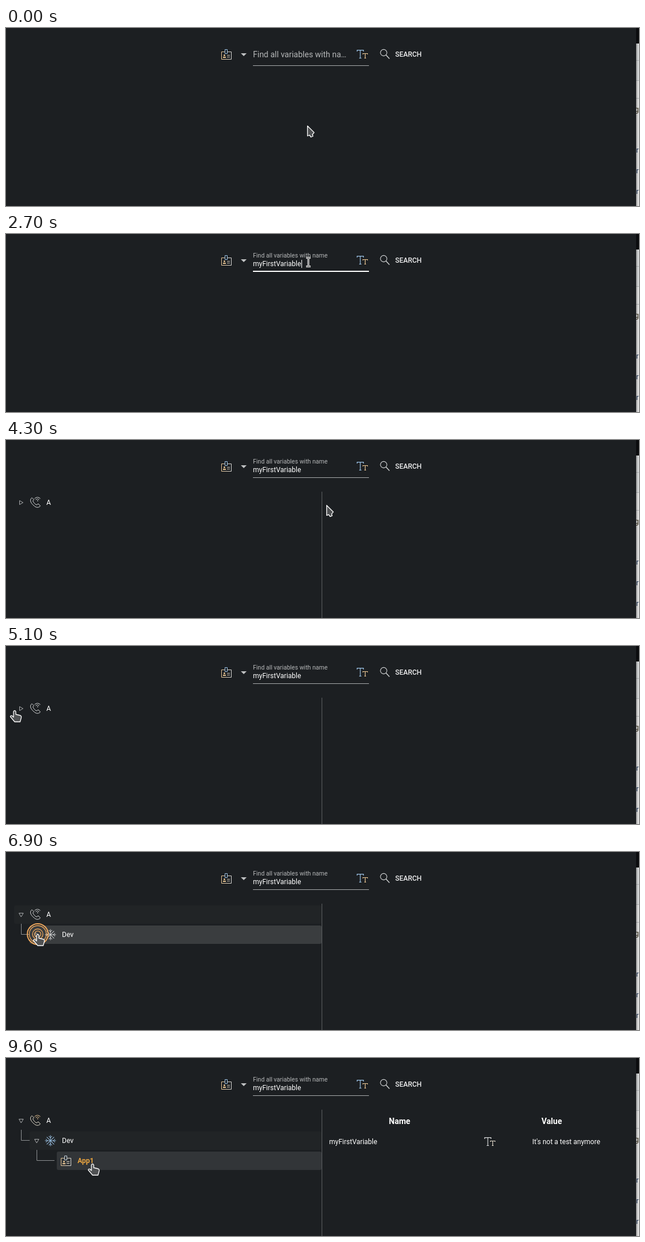
An HTML page with a canvas that plays this animation: 1097 by 310 pixels, repeating every 9.7 s.

```html
<!DOCTYPE html>
<html lang="en">
<head>
<meta charset="utf-8">
<title>Variable search</title>
<style>
html, body { margin: 0; width: 1097px; height: 310px; overflow: hidden; background: #1c1f22; }
canvas { display: block; }
</style>
</head>
<body>
<canvas id="stage" width="1097" height="310"></canvas>
<script>
const g = document.getElementById('stage').getContext('2d');
const LOOP = 9700, STEP = 100;
const GRAY = '#a9abad', DIM = '#85888a', LIGHT = '#d4d6d7', WHITE = '#fff';
const BLUE = '#9cc3e6', SAND = '#e6c391', ORANGE = '#eda75d';

// Pointer legs: start, end, from x,y, control x,y, to x,y
const LEGS = [
  [400, 1000, 522, 170, 526, 100, 512, 41],
  [2600, 2700, 512, 41, 518, 45, 524, 49],
  [2700, 3100, 524, 49, 620, 80, 720, 48],
  [4000, 5000, 720, 48, 330, 232, 19, 112],
  [5000, 5100, 19, 112, 17, 112, 15, 112],
  [5100, 5400, 15, 112, 20, 112, 24, 111],
  [6000, 6800, 24, 111, 38, 130, 55, 143],
  [7000, 8000, 55, 143, 100, 172, 150, 184]
];
const CLICKS = [1100, 3500, 5500, 6900, 8100];

const clamp = v => Math.max(0, Math.min(1, v));
const progress = (t, a, b) => clamp((t - a) / (b - a));
const smooth = u => u * u * (3 - 2 * u);
const easeOut = u => 1 - (1 - u) ** 3;
const mix = (a, b, u) => a + (b - a) * u;

function text(s, x, y, color = WHITE, size = 12, weight = 400) {
  g.font = `${weight} ${size}px Roboto, sans-serif`;
  g.fillStyle = color;
  g.fillText(s, x, y);
}

function rect(x, y, w, h, color, r = 0) {
  g.fillStyle = color;
  g.beginPath();
  g.roundRect(x, y, w, h, r);
  g.fill();
}

function stroke(d, color, width = 1) {
  g.strokeStyle = color;
  g.lineWidth = width;
  g.stroke(new Path2D(d));
}

function circle(x, y, r, color, width = 1) {
  g.beginPath();
  g.arc(x, y, r, 0, 7);
  g.strokeStyle = color;
  g.lineWidth = width;
  g.stroke();
}

function at(x, y, draw) {
  g.save();
  g.translate(x, y);
  draw();
  g.restore();
}

function badge(x, y, left, right, clip) {
  at(x, y, () => {
    const fade = g.createLinearGradient(0, 0, 20, 0);
    fade.addColorStop(0, left);
    fade.addColorStop(1, right);
    stroke('M7 5.5H1.5V18.5H18.5V5.5H12M11 11.5H16M11 14.5H16', fade);
    stroke('M7.5 8.5V1.5H11.5V8.5Z', clip);
    rect(5, 10, 3, 3, left, 1.5);
    rect(4, 14, 5, 2, left);
  });
}

function letters(x, y, big, small) {
  at(x, y, () => {
    stroke('M.5 3V.7H11.5V3M6 .7V14.5M4 14.5H8', big, 1.2);
    stroke('M10.5 8V6.5H18.5V8M14.5 6.5V14.5M13 14.5H16', small, 1.2);
  });
}

function lens(x, y, color) {
  circle(x, y, 5.6, color, 1.1);
  stroke(`M${x + 4} ${y + 4}L${x + 10} ${y + 10.5}`, color, 1.3);
}

function phone(color, waves) {
  stroke('M45 100.5C40 104 43 110 48 114C52 118 56 118.5 59.5 115L56 111L53 113C50 112 48 109 46.5 106L48.5 104Z', color);
  stroke('M49.5 102Q54.500 97.500 59.500 102M51.500 104Q54.500 101 57.500 104', waves);
  rect(54, 105, 1.5, 1.5, waves);
}

function snowflake(color) {
  at(77, 144, () => {
    for (let i = 0; i < 8; i++) {
      stroke(i % 2 ? 'M0 0V-9' : 'M0 0V-9.500M-3 -8L0 -5L3 -8', color);
      g.rotate(Math.PI / 4);
    }
  });
}

function twisty(x, y, open) {
  at(x, y, () => stroke(open ? 'M-3.500 -2.500H4L.2 4Z' : 'M-2.500 -3.500V3.500L3.500 0Z', GRAY));
}

function backdrop() {
  rect(0, 0, 1097, 310, '#1c1f22');
  rect(1092, 0, 5, 310, '#f8f8f8');
  rect(1092, 27, 5, 64, '#eceeef');
  for (const y of [56, 91, 122]) rect(1092, y, 5, 1, '#c4c7ca');
  g.save();
  g.beginPath();
  g.rect(1092, 0, 5, 310);
  g.clip();
  text('g', 1089.5, 146, '#3c3520', 13);
  for (const y of [217, 253, 289]) text('r', 1092, y, '#263f63', 13);
  g.restore();
  const shade = g.createLinearGradient(1092, 0, 1097, 0);
  shade.addColorStop(0, 'rgba(0,0,0,.35)');
  shade.addColorStop(1, 'rgba(0,0,0,.03)');
  rect(1092, 0, 5, 310, shade);
  rect(1092, 0, 5, 27, '#0b0c0e');
}

function searchBar(t) {
  const busy = t >= 3600 && t < 3800, shift = busy ? 3 : 0;
  const focused = t >= 1100;

  if (busy) rect(644, 26, 80, 56, '#212427', 3);
  else if (t >= 3000 && t < 4200) rect(632, 28, 104, 36, '#212427', 3);

  if (busy) badge(372, 36, DIM, DIM, DIM);
  else badge(372, 36, SAND, LIGHT, BLUE);
  g.fillStyle = busy ? DIM : '#c0c2c3';
  g.fill(new Path2D('M407 44H417L412 49Z'));

  const lift = easeOut(progress(t, 1100, 1500));
  text(focused ? 'Find all variables with name' : 'Find all variables with na…',
    428, mix(50.5, 41, lift), busy ? '#858789' : '#b5b7b8', mix(14, 10.5, lift));
  if (t >= 2100) text('myFirstVariable', 428, 56, busy ? '#b0b2b3' : WHITE);
  if (t >= 1500 && t < 3100) rect(t < 2100 ? 428 : 512, 45, 1, 14, WHITE);

  rect(428, 65, 201 + shift, 1, '#a9abad');
  const focus = t < 3500 ? easeOut(progress(t, 1100, 1400)) : 1 - progress(t, 3450, 3680);
  const width = (201 + shift) * focus;
  if (width > 0) rect(428 + (201 + shift - width) / 2, 64, width, 2, WHITE);

  letters(608 + shift, 38, busy ? GRAY : BLUE, busy ? GRAY : SAND);
  if (busy) {
    rect(602, 48, 3, 1.5, DIM);
    lens(682, 39.5, GRAY);
    text('SEARCH', 664, 70, '#b0b2b3', 12, 500);
  } else {
    lens(654.5, 43, LIGHT);
    text('SEARCH', 674.5, 50, '#eeeeef', 12, 500);
  }
}

function tree(t) {
  if (t < 3800) return;
  const openA = t >= 5600, openDev = t >= 7200, chosen = t >= 8100;
  rect(547, 90, 1, 220, '#5c5f61');

  if (t >= 6100 && !chosen) rect(14, 93, 533, 32, '#212426', 3);
  if (chosen) rect(41, 128, 506, 32, '#212426', 3);
  else if (t >= 6500) rect(41, 128, 506, 32, '#3a3d3f', 3);
  if (chosen) rect(88, 163, 459, 32, t < 8400 ? '#383b3e' : '#323538', 3);

  twisty(26, 109, openA);
  const warm = t >= 7500;
  phone(warm ? '#e3dccb' : LIGHT, warm ? SAND : LIGHT);
  text('A', 70, 113);
  if (openA) {
    stroke('M26.500 125V143.500H41', '#8d9092');
    twisty(53, 144, openDev);
    snowflake(t >= 8600 ? BLUE : LIGHT);
    text('Dev', 97, 148);
  }
  if (openDev) {
    stroke('M53.500 160V178.500H84', '#8d9092');
    const lit = t >= 9500;
    badge(94, 169, lit ? SAND : LIGHT, LIGHT, lit ? '#c7d4df' : LIGHT);
    const color = t < 8400 ? WHITE : t < 8600 ? '#f2c88e' : '#e9a440';
    text('App1', 124, 183, color, 12, chosen ? 700 : 400);
  }
}

function details(t) {
  if (t < 8100) return;
  text('Name', 663.5, 115, WHITE, 14, 700);
  text('Value', 928, 115, WHITE, 14, 700);
  if (t < 8300) return;
  text('myFirstVariable', 560, 150);
  letters(829, 138, LIGHT, '#ddd5c6');
  text("It's not a test anymore", 912, 150);
}

function pointerAt(t) {
  const [a, b, x0, y0, cx, cy, x1, y1] = LEGS.findLast(leg => t >= leg[0]) || LEGS[0];
  const u = t < 500 ? 0 : smooth(progress(t, a, b)), v = 1 - u;
  return [v * v * x0 + 2 * u * v * cx + u * u * x1, v * v * y0 + 2 * u * v * cy + u * u * y1];
}

function outline(d) {
  const path = new Path2D(d);
  g.lineJoin = 'round';
  g.fillStyle = '#505254';
  g.fill(path);
  stroke(path, WHITE, 1.3);
  g.lineJoin = 'miter';
}

function ibeam() {
  const d = 'M-4 -7.500H4M-4 7.500H4M0 -7V7';
  stroke(d, WHITE, 3);
  stroke(d, '#444', 1);
}

function forbidden() {
  g.beginPath();
  g.arc(0, 0, 11, 0, 7);
  g.fillStyle = WHITE;
  g.fill();
  circle(0, 0, 9, '#e0322b', 2.5);
  stroke('M-6 4.500L6 -4.500', '#e0322b', 3);
}

function pointer(t) {
  const [x, y] = pointerAt(t);
  const start = CLICKS.findLast(c => t >= c);
  const r = 18 - (t - start) / 25;
  if (r >= 10) {
    for (const k of [1, .82, .5, .3]) circle(x, y, r * k, ORANGE, k > .9 ? 2 : 1.3);
  }
  const inField = x > 428 && x < 629 && y > 33 && y < 66;
  const onButton = x > 632 && x < 736 && y > 28 && y < 64;
  at(x, y, () => {
    if (t >= 3600 && t < 3800) forbidden();
    else if (inField) ibeam();
    else if (onButton || t > 4500 && x < 160) {
      outline('M-2 12V2Q0 -1 2 2V7L10 9Q12 10 11.500 12.500L9.500 20H0L-7.500 11Q-7 8 -4 10Z');
    } else outline('M.5 .5V18L4 16.500L6.500 20L10 18.500L9 15.500L12 12Z');
  });
}

function frame() {
  const t = Math.floor(performance.now() % LOOP / STEP) * STEP;
  backdrop();
  searchBar(t);
  tree(t);
  details(t);
  pointer(t);
  requestAnimationFrame(frame);
}

// Paths may be given as text or ready made
frame();
</script>
</body>
</html>
```
